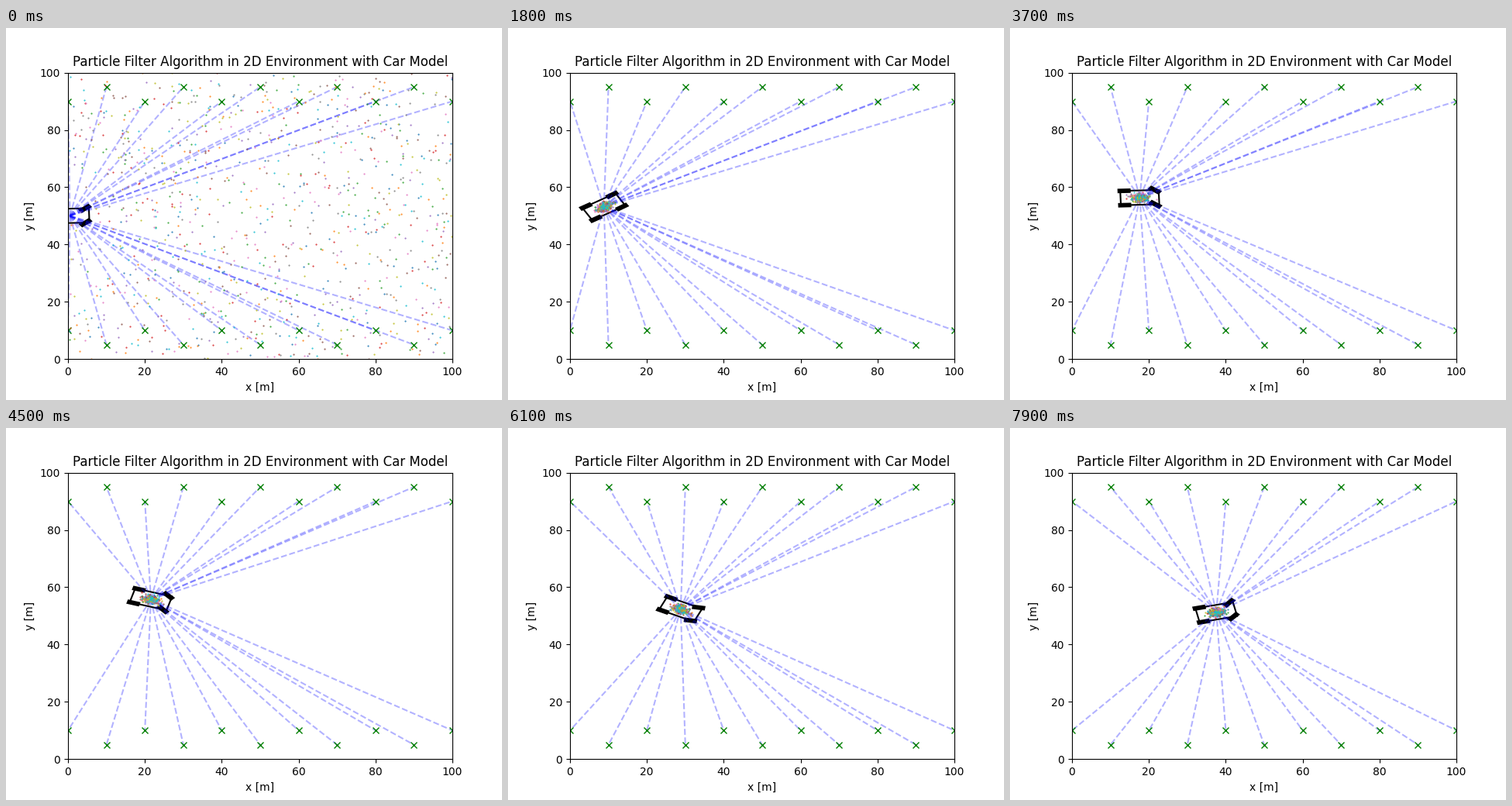
Animation of 640x480 px, one loop 8000 ms. Source, as a matplotlib script:

```python
import numpy as np
import matplotlib.pyplot as plt
from matplotlib.animation import FuncAnimation
from matplotlib.patches import Polygon

FRAMES, INTERVAL = 80, 100
SPEED = 0.5                     # metres per step
OMEGA = 0.0845                  # steering rhythm, rad per step
LENGTH, WIDTH, AXLE = 10, 5, 4
WHEEL = (3, 1)
N_PARTICLES, N_KEPT = 1000, 300

steps = np.arange(FRAMES)
heading = np.radians(1.5 + 29.5 * np.sin(OMEGA * steps))
steering = np.radians(37) * np.cos(OMEGA * steps)
xs = np.cumsum(SPEED * np.cos(heading))
ys = 50 + np.cumsum(SPEED * np.sin(heading))

landmarks = []
for i in range(11):
    off = 10 if i % 2 == 0 else 5
    landmarks += [(10 * i, 100 - off), (10 * i, off)]


def rotate(pts, angle):
    c, s = np.cos(angle), np.sin(angle)
    return np.asarray(pts) @ np.array([[c, s], [-s, c]])


def box(length, width):
    a, b = length / 2, width / 2
    return np.array([(-a, -b), (a, -b), (a, b), (-a, b)])


def particles(k):
    rng = np.random.default_rng(100 + k)
    if k == 0:
        return rng.uniform(0, 100, (N_PARTICLES, 2))
    spread = 1 + 0.8 * np.exp(-(k - 1) / 2)
    cloud = rng.normal(0, 1, (N_KEPT, 2)) * (1.15 * spread, 0.68 * spread)
    return rotate(cloud, heading[k]) + (xs[k], ys[k])


fig, ax = plt.subplots(figsize=(6.4, 4.8), dpi=100)
ax.set(xlim=(0, 100), ylim=(0, 100), xlabel="x [m]", ylabel="y [m]",
       title="Particle Filter Algorithm in 2D Environment with Car Model")

body = ax.add_patch(Polygon(box(LENGTH, WIDTH), fill=False, ec="black", lw=1.5))
wheels = [ax.add_patch(Polygon(box(*WHEEL), fc="black", ec="black", lw=1.5))
          for _ in range(4)]
mounts = [(sx * AXLE, sy * WIDTH / 2) for sx in (-1, 1) for sy in (-1, 1)]

rays = [ax.plot([], [], "b--", alpha=0.3)[0] for _ in landmarks]
ax.plot(*zip(*landmarks), "x", color="green")
dots = [ax.plot([], [], ".", ms=1, color=f"C{c}")[0] for c in range(10)]


def update(k):
    pos = np.array([xs[k], ys[k]])
    body.set_xy(rotate(box(LENGTH, WIDTH), heading[k]) + pos)
    for wheel, mount in zip(wheels, mounts):
        turn = heading[k] + (steering[k] if mount[0] > 0 else 0)
        wheel.set_xy(rotate(box(*WHEEL), turn) + rotate(mount, heading[k]) + pos)
    for ray, (lx, ly) in zip(rays, landmarks):
        ray.set_data([pos[0], lx], [pos[1], ly])
    pts = particles(k)
    for c, dot in enumerate(dots):
        dot.set_data(pts[c::10, 0], pts[c::10, 1])
    return [body, *wheels, *rays, *dots]


anim = FuncAnimation(fig, update, frames=FRAMES, interval=INTERVAL,
                     repeat=True, repeat_delay=0)
plt.show()
```
